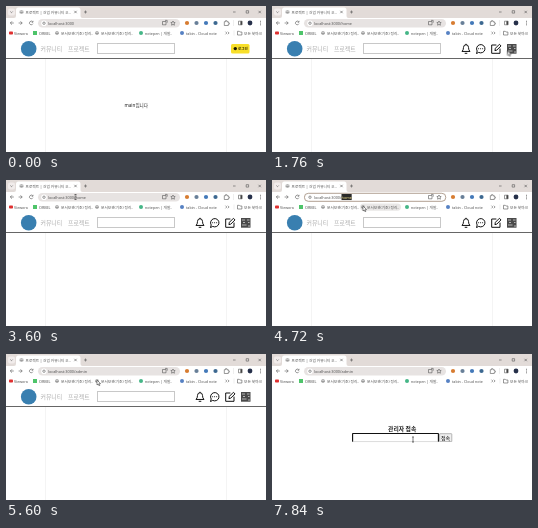
Animation, 260 px wide and 146 px high, one loop 8 s. Source, as an HTML page:

```html
<!DOCTYPE html>
<html lang="ko">
<head>
<meta charset="utf-8">
<title>Admin page</title>
<style>
html, body { margin: 0; width: 100%; height: 100%; overflow: hidden; background: #fff; }
svg { display: block; width: 260px; height: 146px; }
text { font: 3.85px "Noto Sans", "Noto Sans CJK KR", sans-serif; fill: #555; white-space: pre; }
.line { fill: none; stroke: #555; stroke-width: .6; }
.bold { fill: none; stroke: #111; stroke-width: 1; stroke-linejoin: round; stroke-linecap: round; }
.small { font-size: 3.7px; }
.link { fill: #2456b8; }
.nav { font-size: 5.9px; fill: #aaa; }
.picked { fill: #f4e48c; }

/* 1% of the loop is 80 ms */
.step { animation: 8s step-end infinite; }
.guest { animation-name: guest; }
.member { animation-name: member; }
.site { animation-name: site; }
.admin { animation-name: admin; }
.load { animation-name: load; }
.idle { animation-name: idle; }
.edit { animation-name: edit; }
.hover { animation-name: hover; }
.home { animation-name: home; }
.path { animation-name: path; }
.list { animation-name: list; }
.panel { animation-name: panel; }
.extra { animation-name: extra; }
.mark { animation-name: mark; }
.rest { animation-name: rest; }
.focus { animation-name: focus; }
.arrow { animation-name: arrow; }
.beam { animation-name: beam; }
.mouse { animation: mouse 8s ease-in-out infinite; }
.spin { transform-box: fill-box; transform-origin: center; animation: spin .8s linear infinite; }

@keyframes guest { 0% { opacity: 1 } 18%, 100% { opacity: 0 } }
@keyframes member { 0% { opacity: 0 } 18%, 100% { opacity: 1 } }
@keyframes site { 0% { opacity: 1 } 80%, 100% { opacity: 0 } }
@keyframes admin { 0% { opacity: 0 } 80%, 100% { opacity: 1 } }
@keyframes load { 0% { opacity: 0 } 15% { opacity: 1 } 18%, 100% { opacity: 0 } }
@keyframes idle { 0% { opacity: 1 } 15% { opacity: 0 } 18%, 100% { opacity: 1 } }
@keyframes edit { 0% { opacity: 0 } 49% { opacity: 1 } 69%, 100% { opacity: 0 } }
@keyframes hover { 0% { opacity: 0 } 56% { opacity: 1 } 69%, 100% { opacity: 0 } }
@keyframes home { 0% { opacity: 0 } 18% { opacity: 1 } 60%, 100% { opacity: 0 } }
@keyframes path { 0% { opacity: 0 } 60%, 100% { opacity: 1 } }
@keyframes list { 0% { opacity: 0 } 60% { opacity: 1 } 69%, 100% { opacity: 0 } }
@keyframes panel { 0% { height: 73px } 63%, 100% { height: 58px } }
@keyframes extra { 0% { opacity: 1 } 63%, 100% { opacity: 0 } }
@keyframes mark {
  0% { clip-path: inset(0 100% 0 0) }
  49% { clip-path: inset(0 75% 0 0) }
  50% { clip-path: inset(0 50% 0 0) }
  52% { clip-path: inset(0 25% 0 0) }
  53%, 100% { clip-path: inset(0) }
}
@keyframes rest {
  0% { clip-path: inset(0 0 0 19%) }
  61% { clip-path: inset(0 0 0 38%) }
  63% { clip-path: inset(0 0 0 68%) }
  64% { clip-path: inset(0 0 0 77%) }
  66%, 100% { clip-path: inset(0 0 0 100%) }
}
@keyframes focus { 0% { opacity: 0 } 97%, 100% { opacity: 1 } }
@keyframes arrow { 0% { opacity: 0 } 1% { opacity: 1 } 44% { opacity: 0 } 56% { opacity: 1 } 96%, 100% { opacity: 0 } }
@keyframes beam { 0% { opacity: 0 } 44% { opacity: 1 } 56% { opacity: 0 } 96%, 100% { opacity: 1 } }
@keyframes mouse {
  0%, 1% { transform: translate(150px, 73px) }
  11%, 27% { transform: translate(235.5px, 44.5px) }
  29%, 31% { transform: translate(236.5px, 44px) }
  34%, 36% { transform: translate(238px, 44px) }
  45%, 48% { transform: translate(69.5px, 17px) }
  53% { transform: translate(80px, 17px) }
  57%, 90% { transform: translate(91px, 26px) }
  97%, 100% { transform: translate(141px, 85.5px) }
}
@keyframes spin { to { transform: rotate(360deg) } }
</style>
</head>
<body>
<svg viewBox="0 0 260 146">
  <defs>
    <g id="globe">
      <circle r="1.8" fill="#777"/>
      <path d="M-1.5-.4H1.5M0-1.6V1.6" stroke="#fff" stroke-width=".5"/>
    </g>
    <g id="lens" class="line"><circle r="1.3"/><path d="M1 1l1.2 1.2"/></g>
    <path id="cross" class="line" d="M-1.2-1.2l2.4 2.4m0-2.4l-2.4 2.4"/>
  </defs>
  <rect width="260" height="146" fill="#fff"/>

  <!-- tab strip -->
  <rect width="260" height="12" fill="#e2dbd8"/>
  <rect x="2" y="2.5" width="7" height="7" rx="2" fill="#f1eceb"/>
  <path class="line" d="M4.3 5.5l1.2 1.2 1.2-1.2"/>
  <path d="M8 12q2 0 2-2V4q0-2.5 2.5-2.5H72q2.5 0 2.5 2.5v6q0 2 2 2z" fill="#fff"/>
  <use class="step idle" href="#globe" x="15.5" y="6"/>
  <g class="step load"><path class="line spin" d="M15.5 4a2 2 0 1 1-2 2" style="stroke:#3975d6"/></g>
  <text class="small" x="19.5" y="7.5">프로젝트 | 건업 커뮤니티 오..</text>
  <use href="#cross" x="69.5" y="6"/>
  <path class="line" d="M78 6h3M79.5 4.5v3M227 6h2.6M240.2 4.7h2.4v2.4h-2.4z"/>
  <use href="#cross" x="253.7" y="6"/>

  <!-- toolbar -->
  <path class="line" d="M7.8 17H4.3m1.7-1.7L4.3 17 6 18.7M12.6 17h3.6m-1.7-1.7l1.7 1.7-1.7 1.7"/>
  <path class="line step idle" d="M26.7 15.9a1.8 1.8 0 1 0 .2 1.8M27 14.8v1.4h-1.4"/>
  <use class="step load" href="#cross" x="25.5" y="17"/>
  <rect x="32" y="13" width="142" height="8.6" rx="4.3" fill="#e7e3e2"/>
  <rect class="step edit" x="32.4" y="13.3" width="141.4" height="8" rx="4" fill="#fff" stroke="#a18d7b" stroke-width=".8"/>
  <circle cx="38" cy="17.2" r="2.8" fill="#fff"/>
  <circle class="line" cx="38" cy="17.2" r="1.2"/>
  <path class="line" d="M156.5 15.5h3.5v3.3h-3.5zM159 14.4h2.2v2.3M167 15l.7 1.4 1.5.2-1.1 1 .3 1.6-1.4-.8-1.4.8.3-1.6-1.1-1 1.5-.2z"/>
  <circle cx="181" cy="17" r="2.1" fill="#d77c31"/>
  <circle cx="190.5" cy="17" r="2.1" fill="#687f98"/>
  <circle cx="200" cy="17" r="2.1" fill="#4379b9"/>
  <circle cx="209.5" cy="17" r="2.1" fill="#3c6890"/>
  <path class="line" d="M218.3 15.7h1.2v-1h1.4v1h1.4v1.2h1v1.3h-1v1.3h-4z"/>
  <path d="M227.5 14v6" stroke="#ddd" stroke-width=".5"/>
  <path class="line" d="M232.5 15.2h3.6v3.6h-3.6z"/>
  <path d="M234.4 15.2h1.7v3.6h-1.7z" fill="#444"/>
  <circle cx="244" cy="17" r="2.4" fill="#26304a"/>
  <path d="M254.5 15.2v.1m0 1.7v.1m0 1.7v.1" stroke="#444" stroke-width=".8" stroke-linecap="round"/>

  <!-- bookmarks -->
  <rect class="step hover" x="88" y="23.5" width="41" height="7.2" rx="3.6" fill="#e9e7e6"/>
  <rect x="3" y="25.5" width="4" height="3" rx=".8" fill="#df3030"/>
  <text class="small" x="8" y="28.5">Viewora</text>
  <rect x="27" y="25" width="4" height="4" fill="#4ec46a"/>
  <text class="small" x="33" y="28.5">ORBEL</text>
  <use href="#globe" x="51" y="27"/>
  <text class="small" x="55" y="28.5">문서보관(기초) 정리..</text>
  <use href="#globe" x="91" y="27"/>
  <text class="small" x="95" y="28.5">문서보관(기초) 정리..</text>
  <circle cx="135" cy="27" r="2" fill="#45b687"/>
  <text class="small" x="139" y="28.5">notepen | 개발..</text>
  <circle cx="176" cy="27" r="2" fill="#5681c3"/>
  <text class="small" x="180" y="28.5">tabin - Cloud note</text>
  <path class="line" d="M219.5 25.7l1.3 1.3-1.3 1.3m2.3-2.6l1.3 1.3-1.3 1.3"/>
  <path d="M228 24.5v5" stroke="#ddd" stroke-width=".5"/>
  <path class="line" d="M231.5 25.3h1.7l.7.7h2v3h-4.4z"/>
  <text class="small" x="238" y="28.5">모든 북마크</text>

  <!-- community page -->
  <g class="step site">
    <circle cx="22.7" cy="42.7" r="7.8" fill="#397fb0"/>
    <text class="nav" x="34.5" y="44.8">커뮤니티</text>
    <text class="nav" x="62" y="44.8">프로젝트</text>
    <rect x="91.5" y="37.5" width="77" height="10" fill="#fff" stroke="#c8c8c8"/>
    <path d="M0 52.5h260" stroke="#666"/>
    <path d="M39.5 53v93M220.5 53v93" stroke="#f4f4f4"/>
    <g class="step guest">
      <rect x="225" y="38" width="18.5" height="9.5" rx="1.5" fill="#f8df2a"/>
      <circle cx="229.3" cy="42.6" r="1.7" fill="#191600"/>
      <text x="232" y="43.9" style="font-size:3.5px;font-weight:700;fill:#332d00">로그인</text>
      <text x="118.5" y="101" style="font-size:4.6px;fill:#222">main입니다</text>
    </g>
    <g class="step member">
      <path class="bold" d="M190.3 45.2q1.2-1 1.2-3.8 0-2.5 2.5-2.7 2.5.2 2.5 2.7 0 2.8 1.2 3.8zM194 38.2v.4M193.1 47.3h1.8"/>
      <path class="bold" d="M204.6 47.2l.6-2.2a4.2 4.2 0 1 1 1.8 1.6z"/>
      <path class="bold" d="M206.6 42.7v.1m2-.1v.1m2-.1v.1"/>
      <path class="bold" d="M224 39h-4.3v8.3h8.3V43M223 44.3l.4-2 4-4 1.6 1.6-4 4z"/>
      <rect x="235" y="38" width="9.5" height="9.7" fill="#4a4a4a"/>
      <path d="M236 40h3m2 0h2.5M237 42.5h2m3 0h1.5M236 45h4.5m1.5 1h2" stroke="#b5b5b5"/>
    </g>
  </g>

  <!-- admin page -->
  <g class="step admin">
    <text x="130.2" y="77" text-anchor="middle" style="font-size:5.8px;font-weight:600;fill:#222">관리자 접속</text>
    <rect x="80.5" y="79.5" width="86" height="8.2" fill="#fff" stroke="#ccc" stroke-width=".7"/>
    <path d="M80.5 87.7v-8.2h86v8.2" fill="none" stroke="#777" stroke-width=".8"/>
    <path class="step focus" d="M80.6 87.4v-7.2q0-.7.7-.7h84.4q.7 0 .7.7v7.2" fill="none" stroke="#111" stroke-width="1.1"/>
    <rect x="167.6" y="79.7" width="12.2" height="8" rx=".5" fill="#efefef" stroke="#888" stroke-width=".6"/>
    <text x="168.9" y="85.5" style="font-size:5px;fill:#111">접속</text>
  </g>

  <!-- suggestions -->
  <g class="step list">
    <rect class="step panel" x="31" y="11" width="144" height="58" rx="4" fill="#fff" stroke="#c4c4c4" stroke-width=".8" style="filter:drop-shadow(0 1px 1.5px #0005)"/>
    <use href="#globe" x="39" y="17.2"/>
    <path d="M31.5 23.5H167q4 0 4 4v2.5q0 4-4 4H31.5z" fill="#e6e4e4"/>
    <use href="#globe" x="39" y="28.7"/>
    <text x="45" y="30.2">프로젝트 | 건업 커뮤니티 오픈.. - <tspan class="link">localhost:3000/admin</tspan></text>
    <use href="#cross" x="163.5" y="28.5"/>
    <use href="#lens" x="38.7" y="39.2"/>
    <text x="45" y="41">localhost:3000/admi - Findolo 검색</text>
    <use href="#globe" x="39" y="50"/>
    <text x="45" y="51.5">프로젝트 | 건업 커뮤니티 오픈.. - <tspan class="link">localhost:3000/admin/home</tspan></text>
    <use href="#globe" x="39" y="61"/>
    <text x="45" y="62.5">프로젝트 | 건업 커뮤니티 오픈.. - <tspan class="link">localhost:3000/admin/settings</tspan></text>
    <g class="step extra">
      <use href="#lens" x="38.7" y="73"/>
      <text x="45" y="74.6">admin</text>
    </g>
  </g>

  <!-- address -->
  <text x="42" y="18.7">localhost:3000</text>
  <g class="step home">
    <text x="68.1" y="18.7">/home</text>
    <g class="step mark">
      <rect x="69.3" y="14" width="10.4" height="6.2" fill="#292929"/>
      <text class="picked" x="69.5" y="18.7">home</text>
    </g>
  </g>
  <g class="step path">
    <text x="68.1" y="18.7">/admin</text>
    <g class="step list">
      <g class="step rest">
        <rect x="69.5" y="13.6" width="12.8" height="6.8" fill="#292929"/>
        <text class="picked" x="69.5" y="18.7">admin</text>
      </g>
    </g>
  </g>

  <!-- pointer -->
  <g class="mouse">
    <path class="step arrow" d="M0 0v5l1.2-1 .8 1.8.8-.4-.8-1.7h1.6z" fill="#fff" stroke="#222" stroke-width=".5"/>
    <path class="step beam" d="M-1-2.5h2M0-2.5v5M-1 2.5h2" fill="none" stroke="#222" stroke-width=".6"/>
  </g>
</svg>
</body>
</html>
```
